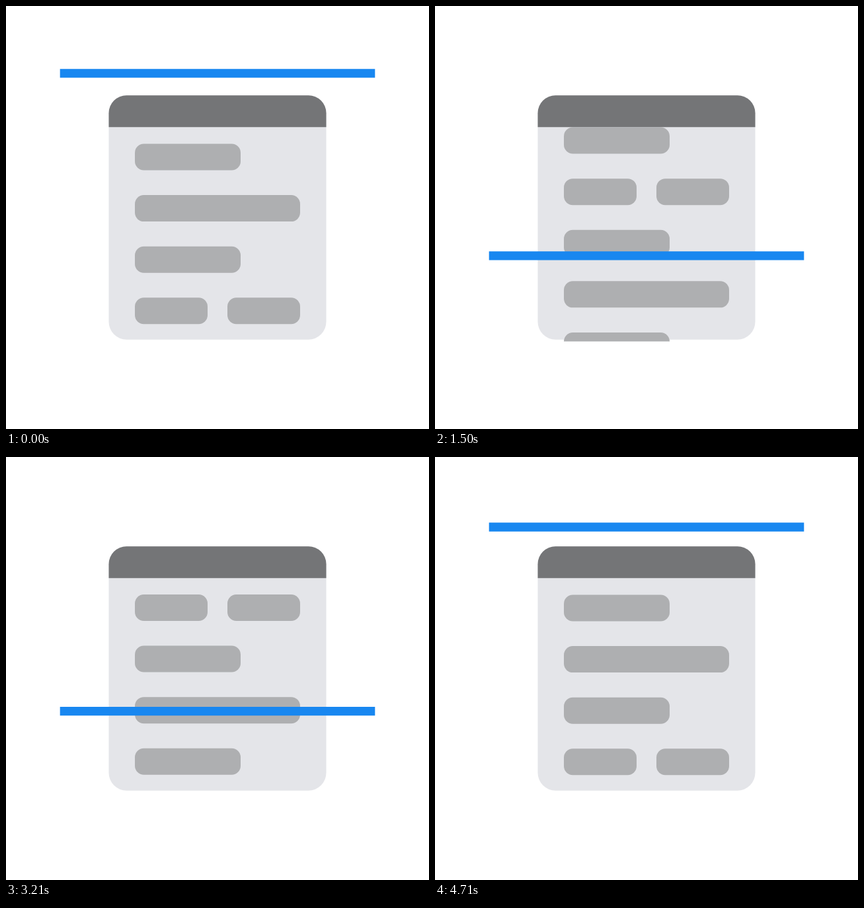
These frames come from a looping animation (640x640 px, 4.78 s). An HTML page with a canvas:

```html
<!DOCTYPE html>
<html lang="en">
<head>
<meta charset="utf-8">
<title>Page scan</title>
<style>
html, body { margin: 0; width: 100%; height: 100%; overflow: hidden; background: #fff; }
canvas { display: block; width: 640px; height: 640px; }
</style>
</head>
<body>
<canvas id="stage" width="640" height="640"></canvas>
<script>
const ctx = document.getElementById('stage').getContext('2d');
const LOOP = 4780, FPS = 14, STEPS = 67;

const ROW_COUNT = 8, ROW_LEFT = 195, ROW_TOP = 208.5, ROW_STEP = 77.6;
const SCROLL_END = 327.4;
const SCAN_SPEED = 13.4, SCAN_TURN = 33.25, SCAN_BOTTOM = 535.5, SOFTNESS = 8;

// Symmetric cubic Bezier ease with handles at (0.2, 0) and (0.8, 1)
function ease(x) {
  if (x <= 0) return 0;
  if (x >= 1) return 1;
  let lo = 0, hi = 1;
  for (let i = 0; i < 30; i++) {
    const t = (lo + hi) / 2, u = 1 - t;
    if (0.6 * t * u * u + 2.4 * t * t * u + t * t * t < x) lo = t;
    else hi = t;
  }
  return lo * lo * (3 - 2 * lo);
}

const move = (step, from, to) => ease((step - from) / (to - from));

// Two swipes down the page, then one back to the top
function scrollAt(step) {
  const down = (move(step, 0, 17.45) + move(step, 18.3, 35.4)) / 2;
  return SCROLL_END * (down - move(step, 35.95, 63.6));
}

// A triangle wave whose corners are rounded off by hyperbolas
function scanAt(step) {
  const fromBottom = SCAN_SPEED * Math.abs(step - SCAN_TURN);
  const fromTop = SCAN_SPEED * STEPS / 2 - fromBottom;
  return SCAN_BOTTOM - Math.hypot(fromBottom, SOFTNESS)
    + Math.hypot(fromTop, SOFTNESS) - fromTop;
}

function box(x, y, w, h, radius, color) {
  ctx.fillStyle = color;
  ctx.beginPath();
  ctx.roundRect(x, y, w, h, radius);
  ctx.fill();
}

const field = (x, y, w) => box(x, y, w, 40, 13.5, '#aeafb1');

// Short and long rows alternate; the fourth is split in two
function drawRow(i, y) {
  if (i === 3) {
    field(ROW_LEFT, y, 110);
    field(ROW_LEFT + 140, y, 110);
  } else {
    field(ROW_LEFT, y, i % 2 ? 250 : 160);
  }
}

function draw(step) {
  box(0, 0, 640, 640, 0, '#fff');
  box(155.5, 135.2, 329, 369.5, 27, '#e4e5e9');

  ctx.save();
  ctx.beginPath();
  ctx.rect(155, 183, 330, 324.4);
  ctx.clip();
  const top = ROW_TOP - scrollAt(step);
  for (let i = 0; i < ROW_COUNT; i++) drawRow(i, top + i * ROW_STEP);
  ctx.restore();

  box(155.5, 135.2, 329, 48, [27, 27, 0, 0], '#747577');
  box(81.7, scanAt(step), 476.6, 13.3, 0, '#1887f0');
}

function tick() {
  // The picture advances 14 times a second, on a 10 ms clock
  const time = Math.floor(performance.now() % LOOP / 10) * 10;
  draw(Math.min(STEPS - 1, Math.floor((time + 5) * FPS / 1000)));
  requestAnimationFrame(tick);
}
tick();
</script>
</body>
</html>
```
